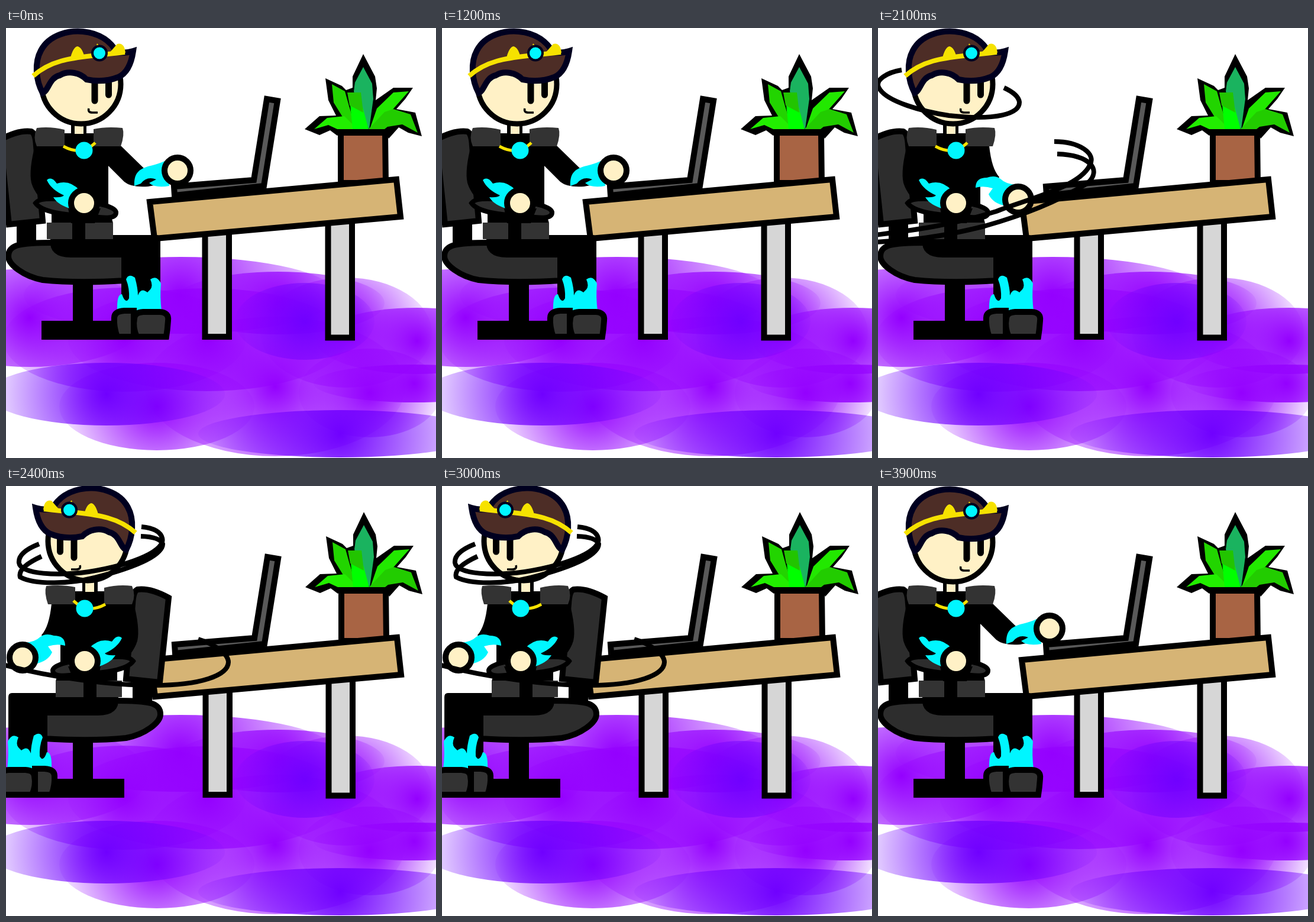
Recreate the animation shown at these times as an HTML page. Size 727x727 px, loop 4.2 s.

```html
<!DOCTYPE html>
<html lang="en">
<head>
<meta charset="utf-8">
<title>Desk spin</title>
<style>
html, body { margin: 0; width: 100%; height: 100%; overflow: hidden; background: #fff; }
svg { display: block; width: 100vw; height: 100vh; }
.o { stroke: #000; stroke-width: 10; }
.dark { fill: #2d2d2d; }
.pad { fill: #333; }
.skin { fill: #fff1c6; }
.cy { fill: #00f6ff; }
.gold { fill: none; stroke: #f6e200; }
.whoosh { fill: none; stroke: #000; stroke-width: 8; }

#typing, #rest, #figure, #head, #hands, #room, .whoosh { animation: 4200ms step-end infinite; }
#typing { animation-name: typing; }
#rest { animation-name: rest; }
#figure { animation-name: turn; }
#head { animation-name: lift; }
#room { animation-name: nudge; }
#front { animation-name: front; }
#back { animation-name: back; }

@keyframes typing {
  0%, 14.285%, 28.571% { transform: none; visibility: visible; }
  7.142%, 21.428% { transform: rotate(7deg); visibility: visible; }
  35.714% { transform: none; visibility: hidden; }
  92.857%, 100% { transform: none; visibility: visible; }
}
@keyframes rest {
  0% { visibility: hidden; }
  35.714% { visibility: visible; }
  92.857%, 100% { visibility: hidden; }
}
@keyframes turn {
  0%, 50%, 64.285%, 78.571%, 100% { transform: matrix(1, 0, 0, 1, 0, 0); }
  42.857%, 57.142%, 71.428% { transform: matrix(-1, 0, 0, 1, 265, 0); }
}
@keyframes lift {
  0%, 50%, 64.285%, 78.571%, 100% { transform: translateY(0); }
  42.857%, 57.142%, 71.428% { transform: translateY(-2px); }
}
@keyframes nudge {
  0%, 50%, 64.285%, 78.571%, 100% { transform: translateX(0); }
  42.857%, 57.142%, 71.428% { transform: translateX(1px); }
}
@keyframes front {
  0%, 57.142%, 71.428%, 85.714%, 100% { visibility: hidden; }
  50%, 64.285%, 78.571% { visibility: visible; }
}
@keyframes back {
  0%, 50%, 64.285%, 78.571%, 100% { visibility: hidden; }
  42.857%, 57.142%, 71.428% { visibility: visible; }
}
</style>
</head>
<body>
<svg viewBox="0 0 727 727">
  <defs id="defs"></defs>
  <g id="floor"></g>

  <g id="room">
    <g class="o" stroke-width="11">
      <path fill="#d6d6d6" d="M336.500 340H377V522H336.500ZM544.500 325H585V523.500H544.500Z"/>
      <path fill="#a86444" d="M566 177H641L642 262H566Z"/>
    </g>
    <path d="M604 44L624 82L627 102L625 122L655 101H688L675 120L660 137L692 143L703 183L680 177L664 168L647 187L640 172H570L560 182L548 173L530 181L505 171L530 149L558 148L545 122L540 85L568 98L575 105L586 101V82Z"/>
    <path fill="#1ab35f" d="M604 66L619 94L621 120L614 171L600 150L588 107L590 92Z"/>
    <path fill="#22d400" d="M551 95L573 107L580 132L592 171L570 152L554 126Z"/>
    <path fill="#22ee00" d="M521 171L543 152L572 149L594 171H560L545 164Z"/>
    <path fill="#22e800" d="M655 109L681 107L650 142L615 171L627 136Z"/>
    <path fill="#22cc00" d="M613 171L640 142L655 137L684 146L696 177L670 163L645 167L640 171Z"/>
    <path fill="#00ff00" d="M582 130L603 134L613 171H586Z"/>
    <path fill="#22c400" d="M577 109L600 109L604 143L581 131Z"/>
    <path class="o" fill="#d6b475" d="M243 294L660 256L667 319L251 356Z"/>
    <path class="o" fill="#595959" d="M284 268L419 257L441 120L459 123L436 267L285 283Z"/>
  </g>

  <path d="M113 425H147V495H200V527H60V495H113Z"/>

  <g id="figure">
    <path class="o dark" d="M-10 189C10 178 28 173 43 175Q50 178 51 200L62 326L5 332Z"/>
    <path d="M18 330H51V366H18Z"/>
    <path class="o dark" d="M4 386C4 366 24 363 80 363H200V427Q120 432 62 426C30 420 4 400 4 386Z"/>

    <path d="M75 350H255Q261 350 261 357V478H195V388H110Q72 388 75 357Z"/>
    <path d="M52 178H173V300L181 330V357H77V305Q50 285 43 262Q38 240 50 195Z"/>
    <path class="pad" d="M69 329H112V357H69ZM134 329H181V357H134Z"/>
    <path class="cy" d="M188 478Q187 450 196 450Q202 468 208 457Q209 440 203 425Q207 414 218 422Q223 440 223 452Q228 438 239 447L244 442Q249 436 244 425Q255 417 262 432Q260 455 263 478Z"/>
    <path class="o pad" d="M183 490Q183 479 200 478H216V522H188Q182 506 183 490Z"/>
    <path class="o pad" d="M217 491Q217 481 232 480H260Q276 481 274 495Q273 510 271 522H221Q214 506 217 491Z"/>

    <g id="typing" style="transform-origin:180px 205px">
      <path d="M165 195L194 199L233 237L272 262L240 268Q212 270 200 260L168 228Z"/>
      <path class="cy" d="M217 267C216 245 225 239 240 234C258 230 266 226 275 222L276 267Q252 271 242 262L254 256Q238 250 228 263Z"/>
      <circle class="o skin" cx="290" cy="241" r="22"/>
    </g>
    <g id="rest">
      <path d="M165 195L188 199Q192 238 205 252L200 262L165 265Z"/>
      <path class="cy" d="M165 268Q166 253 184 253Q198 248 207 255Q216 264 234 265L217 301Q194 297 187 281L194 271Q178 266 165 270Z"/>
      <circle class="o skin" cx="237" cy="290" r="22"/>
    </g>

    <path class="pad" d="M52 169Q75 166 99 172V200H52Q45 185 52 169ZM148 171Q170 166 197 169Q201 180 194 200H148Z"/>
    <path d="M110 155H136V180H110Z"/>
    <path class="skin" d="M116 155H131V179H116Z"/>
    <path class="gold" stroke-width="5" d="M97 200Q128 217 151 194"/>
    <circle class="cy" cx="132" cy="207" r="14.500"/>

    <path class="dark" stroke="#000" stroke-width="8" d="M50 296C56 287 78 288 100 290C142 293 186 300 186 312C186 324 163 321 140 318C100 317 60 311 50 296Z"/>
    <path d="M105 305H160L150 330H110Z"/>
    <path class="cy" d="M69 257Q77 250 86 263Q108 256 125 275L112 306Q88 300 80 286Q94 287 98 283Q76 273 69 257Z"/>
    <circle class="o skin" cx="132" cy="296" r="22"/>

    <g id="head">
      <circle class="skin" cx="127" cy="95" r="67" stroke="#000" stroke-width="9"/>
      <path fill="none" stroke="#000" stroke-width="11" stroke-linecap="round" d="M150 92V123M173.500 85V113"/>
      <path fill="none" stroke="#000" stroke-width="3.500" d="M140 136Q138 143 146 143H155"/>
      <path fill="#4d2d26" stroke="#00001f" stroke-width="10" d="M62 110C50 88 48 58 59 38C74 10 108 4 130 6C160 9 178 24 187 41Q203 43 215 39Q210 74 190 83C170 91 150 90 136 87C126 76 106 71 91 80C73 84 72 106 62 110Z"/>
      <path class="gold" stroke-width="8" d="M46 81C75 55 110 51 145 47L201 41"/>
      <path fill="#f6e200" d="M108 54Q113 32 121 31Q129 33 133 50ZM150 40L154 26L162 35ZM174 43L188 27Q200 24 202 42Z"/>
      <circle class="cy" cx="158" cy="42.500" r="12" stroke="#00001f" stroke-width="4"/>
    </g>
  </g>

  <path id="front" class="whoosh" d="M40 71C15 75-5 88 1 100C12 125 80 142 120 148C200 157 240 145 239 125Q237 112 213 101M298 192C340 192 370 212 358 232C340 270 250 290 200 310C120 335 50 343-5 350M303 213C360 215 378 240 355 262C300 295 250 315 180 335C100 355 60 358-5 362"/>
  <path id="back" class="whoosh" d="M56 98Q20 112 22 130C25 150 90 152 140 145C220 132 270 108 264 88Q260 72 229 69M60 119Q19 138 24 154C50 168 110 165 150 155C240 132 265 112 265 98Q260 86 228 85M-5 302C80 325 180 337 250 337C330 337 375 320 376 298C376 282 348 266 325 259"/>
</svg>
<script>
// cx, cy, rx, ry, hue (0 = indigo, 1 = violet)
const pools = [
  [200, 527, 205, 88, 1], [340, 527, 235, 87, 1], [295, 452, 265, 65, 1],
  [40, 490, 200, 83, 1], [460, 465, 180, 53, 1], [575, 515, 145, 93, 1],
  [455, 606, 220, 118, 1], [695, 529, 170, 56, 1], [505, 496, 118, 65, 0],
  [255, 640, 165, 74, 1], [170, 619, 200, 53, 0], [615, 617, 120, 75, 1],
  [690, 601, 170, 32, 1], [565, 686, 240, 40, 0]
];
const tint = ["#7000ff", "#9400ff"];
let grads = "", shapes = "";
pools.forEach(([x, y, rx, ry, h], i) => {
  const stop = (at, alpha) => `<stop offset="${at}" stop-color="${tint[h]}" stop-opacity="${alpha}"/>`;
  grads += `<radialGradient id="p${i}" gradientUnits="userSpaceOnUse" cx="${x}" cy="${y}" r="${rx * 1.08}">${stop(0, 1)}${stop(1, 0)}</radialGradient>`;
  shapes += `<ellipse cx="${x}" cy="${y}" rx="${rx}" ry="${ry}" fill="url(#p${i})"/>`;
});
document.getElementById("defs").innerHTML = grads;
document.getElementById("floor").innerHTML = shapes;
</script>
</body>
</html>
```
